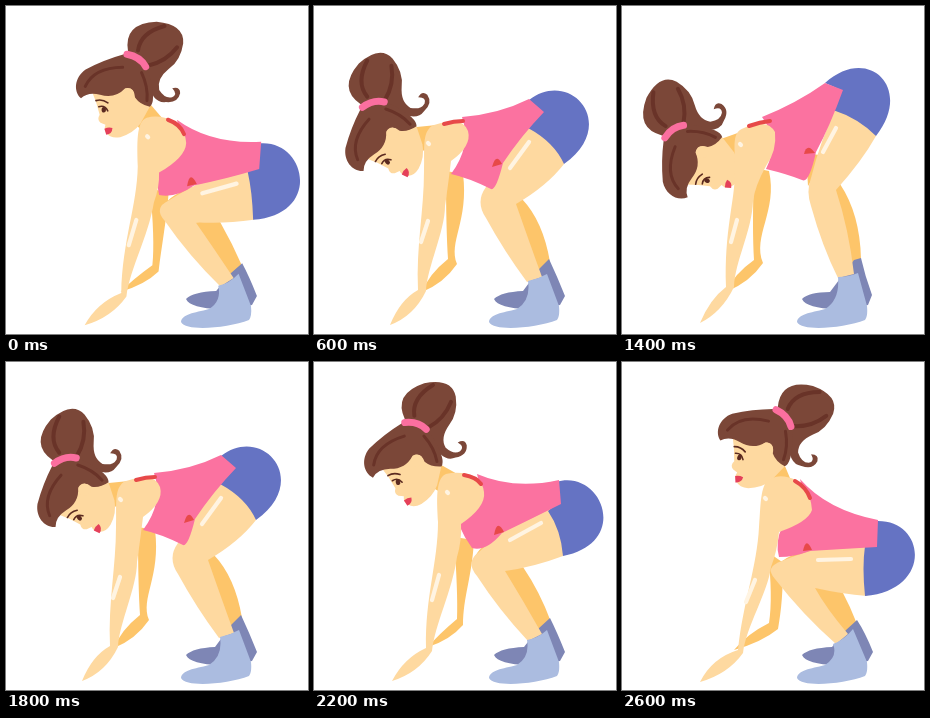
Write an HTML page that moves like this. It is 302 px wide and 328 px high and loops after 2800 ms.

```html
<!DOCTYPE html>
<html lang="en">
<head>
<meta charset="utf-8">
<style>
  html, body { margin: 0; width: 100%; height: 100%; overflow: hidden; background: #fff; }
  svg { display: block; }
  path { stroke-linecap: round; }
</style>
</head>
<body>
<svg id="stage" width="302" height="328" viewBox="0 0 302 328">
  <g id="back"></g>
  <g id="head">
    <path fill="#7b4738" d="M122 47Q117 19 150 17Q178 19 177 38Q175 55 163 64Q151 74 154 85Q160 94 167 92Q173 89 167 83Q175 81 175 88Q173 98 161 97Q147 99 142 75L136 57Z"/>
    <path fill="none" stroke="#693328" stroke-width="4" d="M132 46Q134 28 158 21M142 61Q160 57 171 42"/>
    <path fill="#fed9a0" d="M86 86Q92 99 95 111Q92 116 96 119L101 121Q99 126 103 130Q107 135 116 133Q129 129 136 119L146 100L135 70L90 75Z"/>
    <path fill="#7b4738" d="M76 95C68 88 69 74 80 66Q98 56 118 50Q139 50 145 74Q151 97 145 102Q135 100 130 93Q129 82 120 84Q110 95 95 91Q83 88 76 95Z"/>
    <path fill="none" stroke="#693328" stroke-width="3" d="M80 83Q88 64 117 63M136 68Q143 82 142 96"/>
    <ellipse fill="#fed9a0" cx="123" cy="90" rx="6" ry="6"/>
    <path fill="none" stroke="#fb6f9f" stroke-width="7" d="M121 50Q134 52 140 62"/>
    <path fill="none" stroke="#5b2a20" stroke-width="1.6" d="M91 97Q97 95 103 99M94 103Q100 101 103 107"/>
    <ellipse fill="#5b2a20" cx="99" cy="106" rx="2.2" ry="2.8"/>
    <path fill="#e5405a" d="M100 125Q104 123 108 124Q108 130 102 131Z"/>
  </g>
  <g id="front"></g>
</svg>
<script>
const SKIN = '#fed9a0', SHADE = '#fdc56a', PINK = '#fb72a0', RED = '#e74949';
const STEP = 200, STEPS = 14;

// Each part has four key poses, from deep squat to raised hips.
const parts = [];
function part(layer, color, width, ...keys) {
  const el = document.createElementNS('http://www.w3.org/2000/svg', 'path');
  el.setAttribute('fill', width ? 'none' : color);
  if (width) {
    el.setAttribute('stroke', color);
    el.setAttribute('stroke-width', width);
  }
  document.getElementById(layer).append(el);
  parts.push({ el, shape: keys[0], values: keys.map(k => k.match(/[\d.]+/g).map(Number)) });
}

// Far arm
part('back', SHADE, 0,
  'M146 190L160 200C162 225 159 250 156 267Q140 280 112 288Q125 272 147 261Q151 235 146 190Z',
  'M140 175L160 178C158 215 149 235 149 263Q136 278 114 285Q125 272 143 257Q144 230 140 175Z',
  'M132 165L149 168C155 215 134 236 143 258Q130 277 108 286Q115 268 134 253Q132 225 132 165Z',
  'M132 162L147 165C156 205 130 230 141 257Q128 276 104 286Q112 268 132 254Q130 225 132 162Z');
// Far leg
part('back', SHADE, 0,
  'M190 225L220 229Q228 244 235 262L222 272ZM155 204Q165 192 190 188L215 200Z',
  'M188 207L209 205Q226 230 237 260L222 272ZM160 200Q160 188 184 174L205 175Z',
  'M195 190L208 193Q229 215 236 256L222 268ZM170 190Q172 178 186 160L200 160Z',
  'M205 185L218 178Q238 208 239 253L230 264ZM186 180Q184 165 190 148L205 150Z');
// Far sock
part('back', '#7e86b5', 0,
  'M180 293Q187 286 210 285L224 268L235 258Q243 270 251 290L246 299C215 306 184 303 180 293Z',
  'M180 293Q187 286 210 285L224 267L236 256Q243 270 251 290L246 299C215 306 184 303 180 293Z',
  'M180 293Q187 286 209 285L226 262L235 253Q243 270 251 290L246 299C215 306 184 303 180 293Z',
  'M180 293Q187 286 208 286L232 254L239 252Q243 270 250 289L246 299C215 306 184 303 180 293Z');
// Near leg
part('back', SKIN, 0,
  'M250 178Q200 182 160 199Q142 205 153 217Q180 252 214 282L226 272Q204 246 193 226Q220 232 245 234L262 210Z',
  'M240 138Q195 160 165 190Q151 200 163 214Q185 248 214 279L228 272Q210 240 191 209Q220 205 249 194L262 165Z',
  'M222 112Q190 140 172 181Q161 196 172 212Q190 245 213 276L228 271Q216 238 202 198Q233 180 250 158L246 128Z',
  'M218 92Q198 135 189 172Q184 185 189 200Q200 240 216 272L232 268Q227 224 214 184Q240 155 254 130L246 108Z');
// Near sock
part('back', '#abbce0', 0,
  'M175 316C176 308 188 307 203 303Q216 295 211 282Q222 278 231 267L245 300Q246 310 243 314C222 322 180 326 175 316Z',
  'M175 316C176 308 188 307 203 303Q216 295 213 278Q224 276 233 268L245 300Q246 310 243 314C222 322 180 326 175 316Z',
  'M175 316C176 308 188 307 203 303Q217 294 214 275Q224 273 233 268L245 300Q246 310 243 314C222 322 180 326 175 316Z',
  'M175 316C176 308 188 307 203 303Q218 294 216 271Q226 271 236 267L245 300Q246 310 243 314C222 322 180 326 175 316Z');
// Shorts
part('back', '#6573c3', 0,
  'M255 159C304 158 311 228 243 234Q240 205 243 184L253 183Z',
  'M242 120C287 106 318 180 249 194Q247 168 234 149L245 140Z',
  'M215 94C256 62 306 118 250 158Q240 136 214 122L228 106Z',
  'M203 77C246 38 292 82 254 130Q236 112 211 104L219 84Z');
// Neck
part('back', SHADE, 24,
  'M150 104L160 128', 'M117 111L140 124', 'M94 134L124 131', 'M98 146L126 136');
// Top
part('back', PINK, 0,
  'M178 117Q205 148 256 158L255 185Q220 187 188 189Q172 195 157 195Q153 180 160 165Q188 150 178 117Z',
  'M163 112Q200 128 245 118L247 142Q215 158 188 171Q172 190 158 186Q150 175 145 163Q172 140 163 112Z',
  'M148 111Q185 108 215 93L230 106Q207 130 189 157Q182 185 177 183Q155 172 137 168Q158 140 148 111Z',
  'M140 111Q175 97 203 77L221 84Q208 120 194 146Q187 178 180 174Q165 168 144 163Q158 135 140 111Z');
part('back', RED, 0,
  'M181 189Q184 174 190 188Z', 'M180 173Q183 156 190 170Z',
  'M178 161Q182 146 188 158Z', 'M182 148Q185 136 193 147Z');
// Near arm
part('front', SKIN, 0,
  'M150 116C138 120 139 140 137 165C135 205 121 240 116 288Q90 296 78 320Q106 312 121 291C124 265 146 230 149 205Q155 190 157 170Q186 160 190 148Q188 120 165 115Q157 113 150 116Z',
  'M132 112C121 116 123 140 124 160C124 200 111 235 112 286Q90 296 78 319Q104 311 118 289C121 262 138 230 143 195Q148 178 147 162Q172 145 170 130Q168 113 148 111Q140 110 132 112Z',
  'M120 119C107 124 111 145 110 165C110 205 102 240 104 284Q86 294 76 319Q100 310 112 285C113 262 131 225 131 200Q134 180 137 155Q158 140 154 125Q150 114 136 116Q128 116 120 119Z',
  'M122 122C108 126 114 145 113 165C113 195 102 225 104 281Q88 293 78 317Q100 306 112 281C113 255 130 225 131 195Q133 180 144 160Q155 145 153 126Q148 117 138 118Q130 118 122 122Z');
part('front', RED, 4,
  'M173 119Q184 125 188 136', 'M150 113Q162 115 167 122',
  'M130 118Q140 115 149 115', 'M127 120Q138 116 148 115');
// Highlights: thigh, forearm, shoulder
part('front', '#fff4e2', 4.2,
  'M196 198L229 197M124 240L133 218M143 136L144 137',
  'M196 178L227 161M118 238L125 213M133 130L134 131',
  'M196 162L215 136M107 236L114 215M114 137L115 138',
  'M201 146L214 122M109 236L115 214M118 138L119 139');

// Head pose: hair tie x, hair tie y, tilt
const headKeys = [[161, 56, 16], [101, 64, -15], [59, 99, -46], [52, 126, -66]];
const head = document.getElementById('head');

// Cubic through the four keys, with a short straight run past the last one.
function blend([a, b, c, d], s) {
  if (s > 3) return d + (d - c) * (s - 3) * 0.6;
  return -a * (s - 1) * (s - 2) * (s - 3) / 6 + b * s * (s - 2) * (s - 3) / 2
    - c * s * (s - 1) * (s - 3) / 2 + d * s * (s - 1) * (s - 2) / 6;
}
const pose = (keys, s) => keys[0].map((_, i) => blend(keys.map(k => k[i]), s));

function draw(now) {
  const step = (Math.floor(now / STEP) + 1) % STEPS;
  const s = Math.min(step, STEPS - step) / 2;
  for (const { el, shape, values } of parts) {
    const numbers = pose(values, s);
    let i = 0;
    el.setAttribute('d', shape.replace(/[\d.]+/g, () => numbers[i++].toFixed(2)));
  }
  const [x, y, tilt] = pose(headKeys, s);
  head.setAttribute('transform', `translate(${x} ${y}) rotate(${tilt}) translate(-130 -56)`);
}

const start = performance.now();
function tick() {
  draw(performance.now() - start);
  requestAnimationFrame(tick);
}
tick();
</script>
</body>
</html>
```
